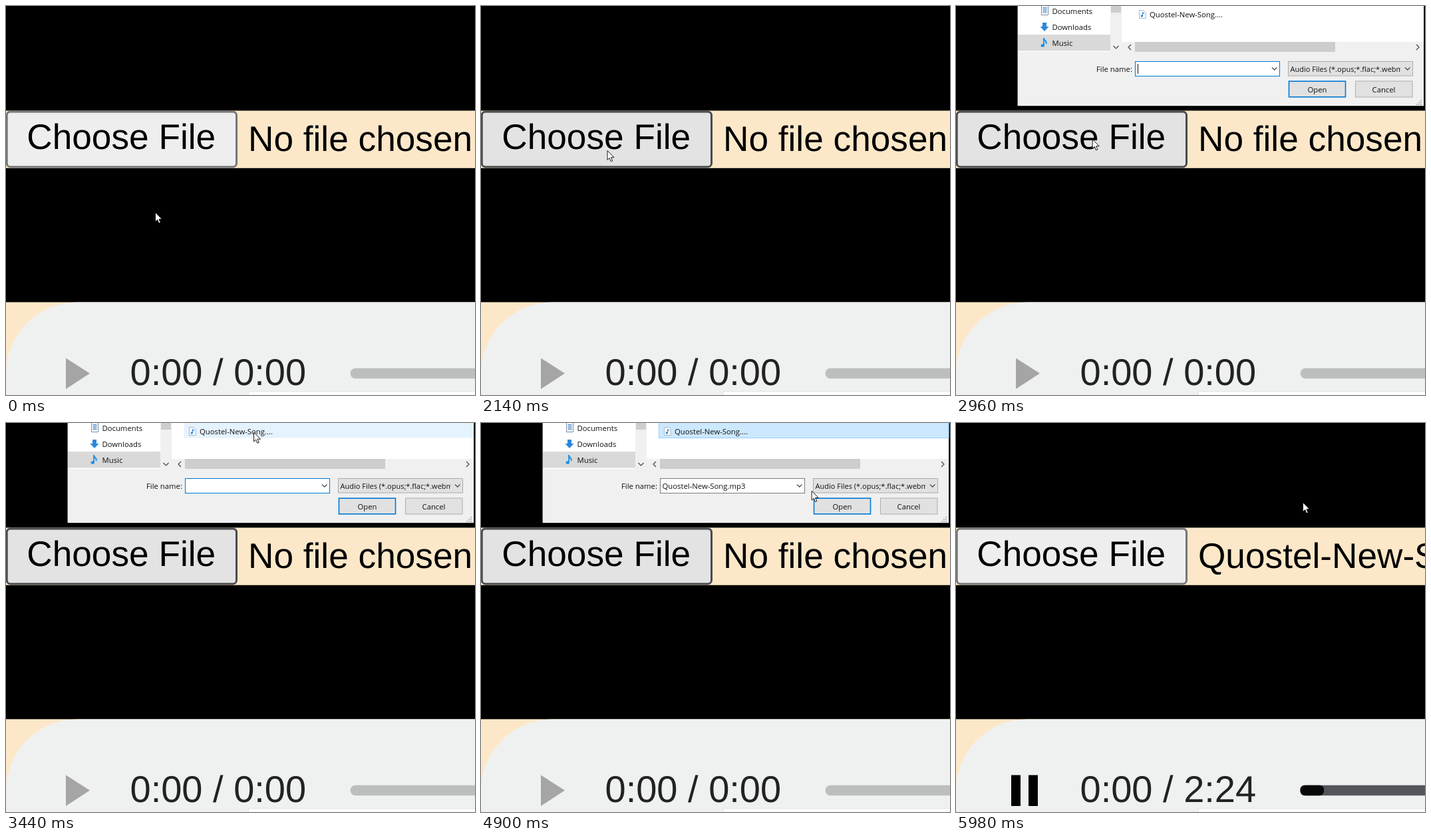
Write an HTML page that moves like this. It is 705 by 585 pixels and loops after 6.2 s.

```html
<!DOCTYPE html>
<html lang="en">
<head>
<meta charset="utf-8">
<title>Choosing an audio file</title>
<style>
  html, body { margin: 0; width: 100%; height: 100%; overflow: hidden; background: #000; }
  svg { display: block; }
  .big { font: 53.2px "Liberation Sans", Arial, sans-serif; text-rendering: geometricPrecision; }
  .time { font: 56px "Liberation Sans", Arial, sans-serif; text-rendering: geometricPrecision; fill: #222; }
  #dialog text { font: 11.3px "Open Sans", "Noto Sans", sans-serif; fill: #111; }
  #dialog .types { font-size: 11px; }
  .mid { text-anchor: middle; }
  .chevron { fill: none; stroke: #444; stroke-width: 1.2; }
</style>
</head>
<body>
<svg width="705" height="585" viewBox="0 0 705 585">
  <clipPath id="typeClip"><rect x="500" y="84" width="168" height="20"/></clipPath>

  <!-- file input -->
  <rect y="157.4" width="705" height="86.4" fill="#fce8c9"/>
  <rect id="choose" x="1.2" y="158.9" width="345.3" height="83" rx="5.5" stroke-width="3"/>
  <text class="big" x="31.3" y="214.6">Choose File</text>
  <text class="big" id="chosen" x="364" y="217.6"></text>

  <!-- audio player -->
  <rect y="445.4" width="705" height="140" fill="#fce8c9"/>
  <path d="M0 585V553A108 108 0 0 1 108 445.400H705V585Z" fill="#eff1f1"/>
  <path id="play" d="M90 529.5L126 552.5L90 576Z" fill="#a5a5a5"/>
  <path id="pause" d="M83 529.5H97V576H83ZM109 529.5H123V576H109Z"/>
  <text class="time" id="time" x="186.5" y="570.3"></text>
  <rect id="track" x="517.5" y="544.7" width="220" height="15.5" rx="7.7"/>
  <rect id="progress" x="517.5" y="544.7" height="15.5" rx="6.5" fill="#080808"/>
  <rect x="364.5" y="579.5" width="350" height="20" fill="#fcfcfc" stroke="#e2e4e4"/>

  <!-- file dialog -->
  <g id="dialog">
    <rect x="92.6" width="610.6" height="150.2" fill="#f0f0f0"/>
    <path d="M93 0H232V69H93ZM249 0H703V54H249Z" fill="#fff"/>
    <rect x="93" y="43" width="139" height="24.5" fill="#d9d9d9"/>
    <path d="M233 0H248V10H233ZM269 54H570V69H269Z" fill="#cdcdcd"/>
    <path class="chevron" d="M236.5 60L240.5 64L244.5 60M263 58L259 62L263 66M692 58L696 62L692 66"/>

    <path d="M128.5 0V13.5H138.5V0" fill="#fff" stroke="#7d8ca0"/>
    <path d="M130.5 3H136.5M130.5 6H136.5M130.5 9H136.5" stroke="#3d7fc4" stroke-width="1.4"/>
    <path d="M130 25H136V31H139.5L133 38L126.5 31H130Z" fill="#2b88d9"/>
    <path d="M132 48.5C132 52 137 52 135.5 57" fill="none" stroke="#1e8fe6" stroke-width="2"/>
    <path d="M132 48V59" stroke="#1e8fe6" stroke-width="1.8"/>
    <ellipse cx="130.3" cy="59.5" rx="2.7" ry="2.2" fill="#1e8fe6"/>
    <text x="144.5" y="12">Documents</text>
    <text x="144.5" y="36">Downloads</text>
    <text x="144.5" y="60">Music</text>

    <rect id="row" x="267.5" y="-2" width="435.5" height="24.5"/>
    <path d="M275.5 6.5H282L285 9.5V18.5H275.5Z" fill="#fff" stroke="#aab4be"/>
    <path d="M280.5 9V15M280.5 9.5L283 11.5" stroke="#2b88d9" stroke-width="1.2"/>
    <circle cx="279.3" cy="15" r="1.7" fill="#2b88d9"/>
    <text x="291" y="17">Quostel-New-Song....</text>

    <text x="211" y="99">File name:</text>
    <rect id="field" x="269.5" y="83.5" width="217" height="22" fill="#fff"/>
    <rect id="selection" x="272" y="87" width="130" height="15.5" fill="#0078d7"/>
    <text id="name" x="272.5" y="99">Quostel-New-Song.mp3</text>
    <path id="caret" d="M273.5 87V102" stroke="#111"/>
    <rect x="499.5" y="83.5" width="187" height="21.5" fill="#e1e1e1" stroke="#adadad"/>
    <text class="types" x="502.5" y="99" clip-path="url(#typeClip)">Audio Files (*.opus;*.flac;*.webm</text>
    <path class="chevron" d="M475 92.5L478.7 96.2L482.4 92.5M675 92.5L678.7 96.2L682.4 92.5"/>

    <rect id="open" x="500.5" y="113.2" width="85" height="23.6"/>
    <text class="mid" x="543" y="129.5">Open</text>
    <rect x="600.5" y="113" width="85.5" height="24" fill="#e1e1e1" stroke="#adadad"/>
    <text class="mid" x="643" y="129.5">Cancel</text>
    <path d="M698 141h2v2h-2zM695 144h2v2h-2zM698 144h2v2h-2zM692 147h2v2h-2zM695 147h2v2h-2zM698 147h2v2h-2z" fill="#bababa"/>
  </g>

  <path id="cursor" d="M0 0V14L3.2 11L5.3 16.3L7.7 15.3L5.5 10.2H10Z" fill="#fff" stroke="#000" stroke-width=".9"/>
</svg>
<script>
  const LOOP = 6200;
  const $ = id => document.getElementById(id);
  const show = (id, on) => $(id).setAttribute('visibility', on ? 'inherit' : 'hidden');
  const paint = (id, fill, stroke, width = 1) => {
    const el = $(id);
    el.setAttribute('fill', fill);
    el.setAttribute('stroke', stroke);
    el.setAttribute('stroke-width', width);
  };
  const ramp = (t, from, to) => Math.min(1, Math.max(0, (t - from) / (to - from)));
  const ease = p => p * p * (3 - 2 * p);

  // Each move: start, end, target x, target y
  const moves = [
    [500, 760, 190, 217.5],
    [2860, 3430, 372.5, 14],
    [4440, 5060, 521.5, 119.5]
  ];

  function cursorAt(t) {
    let x = 224.5, y = 310.5;
    for (const [from, to, tx, ty] of moves) {
      const p = ease(ramp(t, from, to));
      x += (tx - x) * p;
      y += (ty - y) * p;
    }
    return [x, y];
  }

  function draw(t) {
    const [x, y] = cursorAt(t);
    const closed = t >= 5600, playing = t >= 5700;
    const picked = t >= 3790, confirmed = t >= 5360;
    $('cursor').setAttribute('transform', `translate(${x} ${y})`);

    const pressed = t >= 1120 && t < 1240;
    const hovered = !closed && (t > 2000 || y < 243);
    if (pressed) paint('choose', '#f5f5f5', '#8d8d8d', 3);
    else if (hovered) paint('choose', '#e3e3e3', '#4b4b4d', 3);
    else paint('choose', '#eeeeef', '#767678', 3);
    $('chosen').textContent = closed ? 'Quostel-New-Song.mp3' : 'No file chosen';

    $('dialog').setAttribute('opacity', ramp(t, 2180, 2360) * (1 - ramp(t, 5460, 5620)));
    if (confirmed) paint('row', '#d9d9d9', 'none');
    else if (picked) paint('row', '#cce8ff', '#99d1ff');
    else paint('row', x > 267 && y < 23 ? '#e5f3ff' : '#fff', 'none');

    paint('field', '#fff', picked ? '#7a7a7a' : '#0078d7');
    show('name', picked);
    show('selection', confirmed);
    $('name').style.fill = confirmed ? '#fff' : '#111';
    show('caret', !picked && (t < 3090 || t >= 3620));

    const overOpen = x > 500 && y > 113 && y < 137 && t > 4000;
    if (confirmed) paint('open', '#cce4f7', '#005499');
    else paint('open', overOpen ? '#e5f1fb' : '#e1e1e1', '#0078d7', 1.6);

    show('play', !playing);
    show('pause', playing);
    $('time').textContent = playing ? '0:00 / 2:24' : '0:00 / 0:00';
    $('track').setAttribute('fill', playing ? '#525559' : '#bcbebe');
    show('progress', playing);
    $('progress').setAttribute('width', t < 5980 ? 16 : 35.5);
  }

  function tick() {
    draw(performance.now() % LOOP);
    requestAnimationFrame(tick);
  }
  tick();
</script>
</body>
</html>
```
